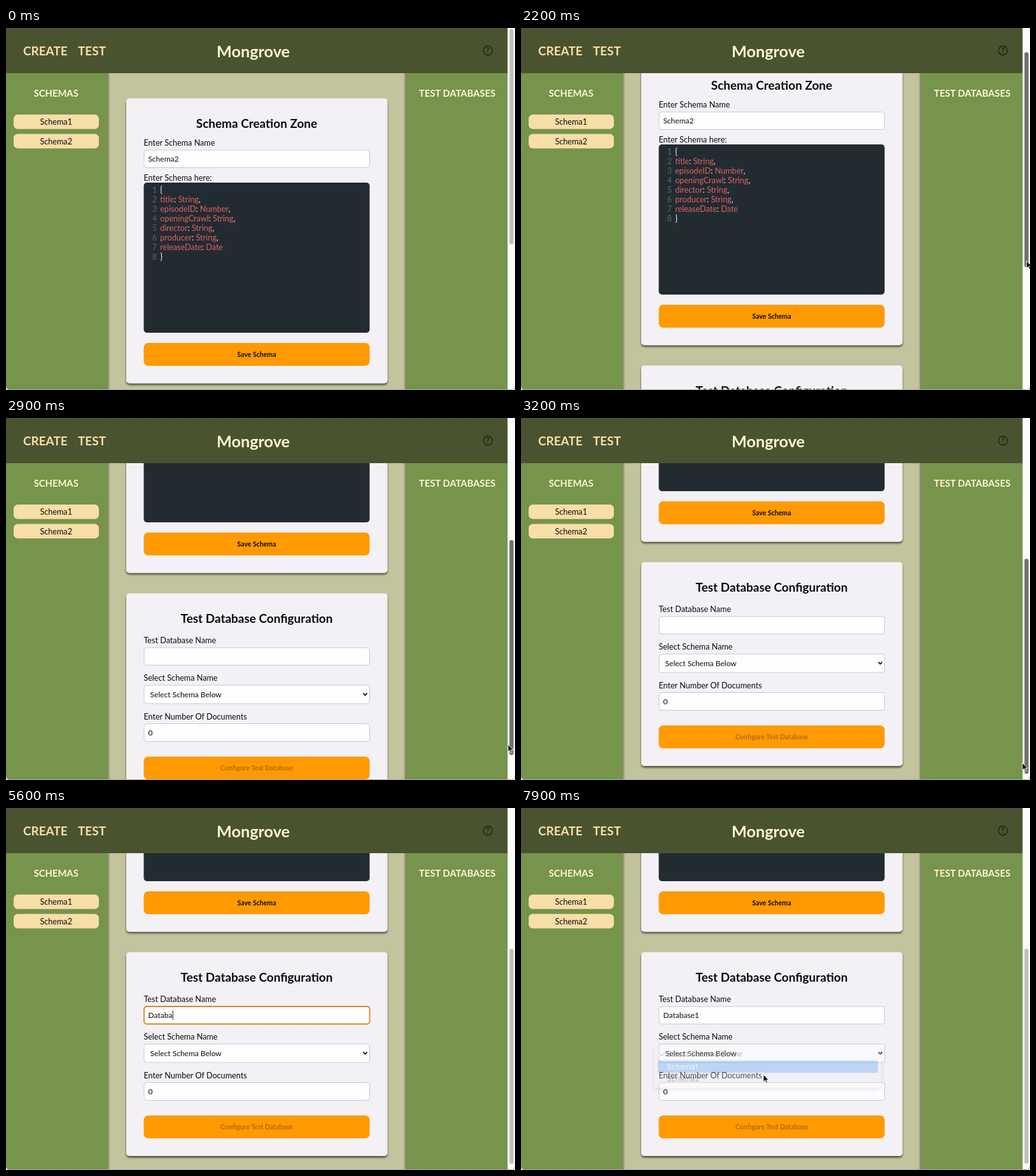
These frames come from a looping animation (800x569 px, 8 s). An HTML page:

```html
<!DOCTYPE html>
<html lang="en">
<head>
<meta charset="utf-8">
<title>Schema Creation Zone</title>
<style>
  html, body { margin: 0; width: 100%; height: 100%; overflow: hidden; background: #fff; }
  svg { display: block; width: 800px; height: 569px; }
  text { font-family: Lato, sans-serif; white-space: pre; }
  .menu text { font-family: Inter, sans-serif; }
</style>
</head>
<body>
<svg id="stage" viewBox="0 0 800 569" xmlns="http://www.w3.org/2000/svg"></svg>
<script>
const LOOP = 8000, MAX_SCROLL = 364;
const $ = id => document.getElementById(id);

const box = (x, y, w, h, fill, r = 0, extra = '') =>
  `<rect x="${x}" y="${y}" width="${w}" height="${h}" rx="${r}" fill="${fill}" ${extra}/>`;
const text = (x, y, size, content, fill = '#0b0b0b', extra = '') =>
  `<text x="${x}" y="${y}" font-size="${size}" fill="${fill}" ${extra}>${content}</text>`;
const MID = 'text-anchor="middle"', BOLD = 'font-weight="700"', TITLE = `${MID} ${BOLD}`;

const card = (y, h, title) =>
  box(189, y, 410.5, h, '#f3f1f5', 5, 'filter="url(#shadow)"') +
  text(394, y + 46, 18.96, title, '#0b0b0b', TITLE);
const label = (y, content) => text(216.4, y, 12.64, content);
const field = (y, h, id = '') =>
  box(217, y, 354.5, h, '#fefdff', 4, `stroke="#cbc9cd" ${id && `id="${id}"`}`);
const button = (y, content, fill) =>
  box(216.5, y, 355, 36, '#ff9a02', 7) + text(394, y + 21.7, 10.53, content, fill, TITLE);

const schemaFields = ['title: String', 'episodeID: Number', 'openingCrawl: String',
  'director: String', 'producer: String', 'releaseDate: Date'];

function codeLines() {
  const body = schemaFields.map((f, i) => {
    const [key, type] = f.split(': ');
    const comma = i < schemaFields.length - 1 ? ',' : '';
    return `<tspan fill="#e0625f">${key}</tspan>: <tspan fill="#e0625f">${type}</tspan>${comma}`;
  });
  return ['{', ...body, '}'].map((line, i) => {
    const y = 258.6 + i * 15;
    return text(237, y, 12.64, i + 1, '#59656d', 'text-anchor="end"') +
           text(242.2, y, 12.64, line, '#f8f8f8');
  }).join('');
}

const schemaCard =
  card(110.5, 448, 'Schema Creation Zone') +
  label(185.3, 'Enter Schema Name') + field(192, 27.5) + text(223.4, 210.3, 12, 'Schema2') +
  label(240.4, 'Enter Schema here:') + box(216.5, 243, 355, 236, '#232b32', 5) + codeLines() +
  button(495, 'Save Schema', '#0b0b0b');

const configCard =
  card(226.5, 320.5, 'Test Database Configuration') +
  label(305, 'Test Database Name') + field(312, 27.5, 'nameField') +
  text(223.6, 330.3, 12, '', '#0b0b0b', 'id="nameText"') +
  box(224, 318.5, 1, 14.5, '#222', 0, 'id="caret"') +
  label(364, 'Select Schema Name') + field(371, 29) + text(226.6, 390, 12, 'Select Schema Below') +
  '<path d="M561.6 383.6l3 3.2 3-3.2" fill="none" stroke="#111" stroke-width="1.8"/>' +
  label(425, 'Enter Number Of Documents') + field(431.5, 28) + text(223.6, 450.2, 12, '0') +
  button(483.3, 'Configure Test Database', '#b06c0b');

const menuItems = ['Select Schema Below', 'Schema1', 'Schema2'];
const rowTop = i => 377 + i * 19.7;
const menu =
  box(210, 373, 356, 67, '#efeef0', 5, 'filter="url(#soft)"') +
  box(215, 0, 346, 19.5, '#4096f5', 3, 'id="highlight"') +
  text(217.5, 391, 11, '✓', '#333', 'id="tick"') +
  menuItems.map((s, i) => text(229, rowTop(i) + 14, 11.6, s, '#222', `id="item${i}"`)).join('');

const sideButton = (y, name) =>
  box(12, y, 134, 22.7, '#f8dea7', 6.5) + text(78.7, y + 16, 12.64, name, '#0b0b0b', MID);
const fade = (id, x1, x2) =>
  `<linearGradient id="${id}" x1="${x1}" x2="${x2}"><stop stop-color="#3b3b25" stop-opacity=".6"/>
   <stop offset=".4" stop-color="#3b3b25" stop-opacity=".22"/>
   <stop offset="1" stop-color="#3b3b25" stop-opacity="0"/></linearGradient>`;

const chrome =
  box(0, 70, 159.5, 499, '#76944b') + box(629, 70, 159.5, 499, '#76944b') +
  box(159.5, 70, 5, 499, 'url(#fadeRight)') + box(624, 70, 5, 499, 'url(#fadeLeft)') +
  text(78.7, 108.4, 14.79, 'SCHEMAS', '#fdf6d3', TITLE) +
  text(709.2, 108.4, 14.79, 'TEST DATABASES', '#fdf6d3', TITLE) +
  sideButton(136, 'Schema1') + sideButton(166.5, 'Schema2') +
  box(0, 0, 788.5, 71, '#4a532f') +
  text(27, 43, 18.96, 'CREATE', '#f9dfa8', BOLD) + text(113, 43, 18.96, 'TEST', '#f9dfa8', BOLD) +
  text(388.5, 45.6, 25.28, 'Mongrove', '#fef6d2', TITLE) +
  '<circle cx="757.4" cy="35.5" r="7" fill="none" stroke="#1c1e14" stroke-width="1.3"/>' +
  text(757.4, 39.4, 10.5, '?', '#1c1e14', TITLE) +
  box(788.5, 0, 11.5, 569, '#faf9fb') + box(791.3, 2, 6.4, 338, '#bfbfc0', 3.2, 'id="thumb"');

const windowEdge =
  '<path d="M0 563v6h6a6 6 0 0 1-6-6zM800 563v6h-6a6 6 0 0 0 6-6z" fill="#f1f1ef"/>' +
  '<path d="M0 563a5.5 5.5 0 0 0 5.5 5.5h789a5.5 5.5 0 0 0 5.5-5.5" fill="none" stroke="#a9aba0"/>';

const pointers =
  `<g id="arrow"><path d="M0 0v11.6l2.7-2.5 1.9 4.2 1.9-.8-1.9-4.1h3.6z"
     fill="#0a0a0a" stroke="#fff" stroke-width=".9" stroke-linejoin="round"/></g>
   <g id="beam" fill="none"><path id="beamPath" d="M-2.5-6q2.5 0 2.5 1.5v9q0 1.5-2.5 1.5M2.5-6q-2.5 0-2.5 1.5M0 4.5q0 1.5 2.5 1.5M-1.4 2.2h2.8"
     stroke="#111" stroke-width="1.1"/></g>`;

$('stage').innerHTML =
  `<defs>${fade('fadeRight', 0, 1)}${fade('fadeLeft', 1, 0)}
    <filter id="shadow" x="-5%" y="-5%" width="110%" height="110%">
      <feDropShadow dx="0" dy="2.4" stdDeviation="1.5" flood-opacity=".65"/></filter>
    <filter id="soft" x="-5%" y="-20%" width="110%" height="150%">
      <feDropShadow dx="0" dy="3" stdDeviation="4" flood-opacity=".3"/></filter>
  </defs>` +
  box(0, 0, 800, 569, '#c3c39d') +
  `<g id="scroll">${schemaCard}<g transform="translate(0 ${MAX_SCROLL})">${configCard}</g></g>` +
  chrome + `<g id="menu" class="menu">${menu}</g>` + windowEdge + pointers;

// Key lists hold [time, ...values]; values between keys are linear.
const scrollKeys = [[1950, 0], [2200, 60], [2900, 315], [3100, MAX_SCROLL]];
const pointerKeys = [[1400, 803, 322], [1700, 796, 330], [1950, 796, 330], [2200, 794.5, 366],
  [2900, 789, 513], [3100, 788, 542], [3200, 788, 542], [3500, 640, 440], [3900, 445, 328],
  [6400, 445, 328], [6800, 447, 379], [7100, 447, 379], [7500, 385, 408], [7800, 381, 415],
  [7900, 381, 419]];
const menuKeys = [[7700, 1], [7800, .65], [7900, .3]];

function at(keys, t) {
  const next = keys.findIndex(k => k[0] > t);
  if (next === 0) return keys[0].slice(1);
  if (next < 0) return keys[keys.length - 1].slice(1);
  const a = keys[next - 1], b = keys[next], p = (t - a[0]) / (b[0] - a[0]);
  return a.slice(1).map((v, i) => v + (b[i + 1] - v) * p);
}

const show = (id, on) => $(id).setAttribute('visibility', on ? 'visible' : 'hidden');
const set = (id, name, value) => $(id).setAttribute(name, value);

function drawMenu(t, y) {
  const open = t >= 7000;
  set('menu', 'display', open ? 'inline' : 'none');
  if (!open) return;
  const row = y < rowTop(1) ? 0 : 1;
  set('menu', 'opacity', at(menuKeys, t)[0]);
  set('highlight', 'y', rowTop(row));
  menuItems.forEach((_, i) => set('item' + i, 'fill', i === row ? '#fff' : '#222'));
  set('tick', 'fill', row === 0 ? '#fff' : '#333');
}

function draw(t) {
  const [scroll] = at(scrollKeys, t), [x, y] = at(pointerKeys, t);
  set('scroll', 'transform', `translate(0 ${-scroll})`);
  set('thumb', 'y', 2 + scroll * 0.602);
  set('thumb', 'fill', t >= 1600 && t < 3400 ? '#6f6f70' : '#bfbfc0');

  const focused = t >= 4000 && t < 6800;
  const typing = t >= 4700 && t < 6300;
  const typed = 'Database1'.slice(0, Math.max(0, Math.floor((t - 4700) / 160) + 1));
  set('nameField', 'stroke', focused ? '#c98f20' : '#cbc9cd');
  set('nameField', 'stroke-width', focused ? 1.8 : 1);
  $('nameText').textContent = typed;
  set('caret', 'x', 224 + (typed ? $('nameText').getComputedTextLength() : 0));
  show('caret', focused && (typing || (t - 4000) % 1000 < 500));

  const overField = t >= 3600 && x > 217 && x < 571 && y > 312 && y < 340;
  const visible = t >= 1400 && !typing;
  for (const id of ['arrow', 'beam']) {
    set(id, 'transform', `translate(${x} ${y})`);
    show(id, visible && overField === (id === 'beam'));
  }
  drawMenu(t, y);
}

function frame(now) {
  draw(Math.floor((now % LOOP) / 100) * 100);
  requestAnimationFrame(frame);
}
draw(0);
requestAnimationFrame(frame);
</script>
</body>
</html>
```
